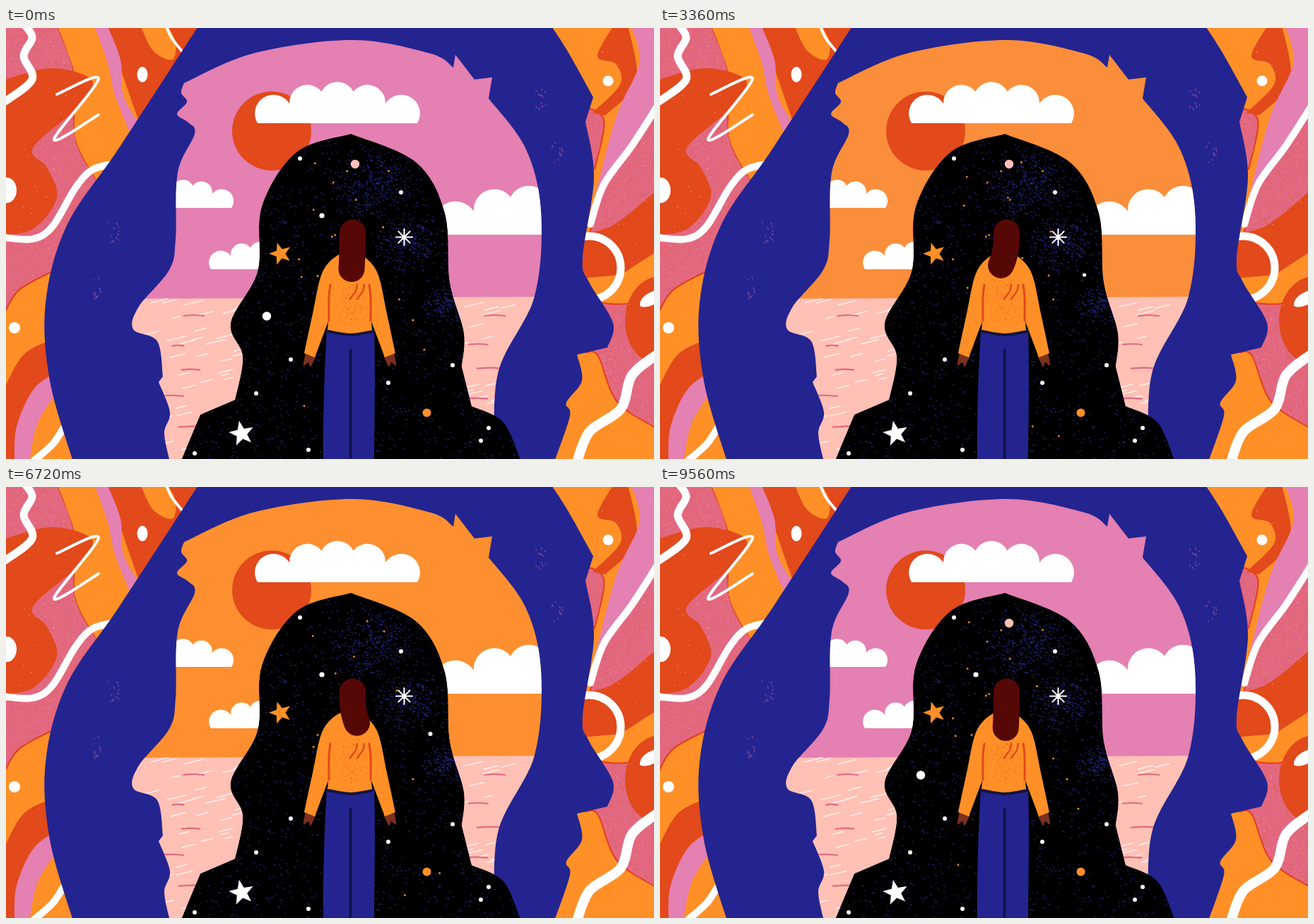
These frames come from a looping animation (917 px wide and 611 px high, 9.6 s). An HTML page:

```html
<!DOCTYPE html>
<html lang="en">
<head>
<meta charset="utf-8">
<title>Inner sky</title>
<style>
  html, body { margin: 0; width: 100%; height: 100%; overflow: hidden; background: #ff9027; }
  svg { display: block; width: 100%; height: 100%; }
</style>
</head>
<body>
<svg id="stage" viewBox="0 0 917 611" preserveAspectRatio="none" stroke-linecap="round" stroke-linejoin="round"></svg>
<script>
const LOOP = 9600, TWINKLE = LOOP / 2, LIT = 3000, FADE = 160;
const C = {
  orange: '#ff9027', red: '#e2491b', pink: '#e480b2', rose: '#e2687f', line: '#e43d1c',
  blue: '#242490', sea: '#ffc0b5', white: '#fff', black: '#000', hair: '#560807', skin: '#7c3020'
};
const stage = document.getElementById('stage');

function add(tag, attrs, parent = stage) {
  const el = document.createElementNS('http://www.w3.org/2000/svg', tag);
  for (const k in attrs) el.setAttribute(k, attrs[k]);
  return parent.appendChild(el);
}

// Smooth line through "x,y x,y"; a slash makes a sharp corner
function curve(text) {
  return text.split('/').map((part, n) => {
    const p = part.trim().split(/\s+/).map(s => s.split(',').map(Number));
    let d = (n ? 'L' : 'M') + p[0];
    for (let i = 0; i < p.length - 1; i++) {
      const b = p[i], c = p[i + 1], a = p[i - 1] || b, e = p[i + 2] || c;
      d += `C${b[0] + (c[0] - a[0]) / 6},${b[1] + (c[1] - a[1]) / 6} ` +
           `${c[0] - (e[0] - b[0]) / 6},${c[1] - (e[1] - b[1]) / 6} ${c}`;
    }
    return d;
  }).join('');
}

const shape = (fill, d, parent, extra) => add('path', { d, fill, ...extra }, parent);
const blob = (fill, text, parent, extra) => shape(fill, curve(text) + 'Z', parent, extra);
const line = (color, width, text, parent) =>
  shape('none', curve(text), parent, { stroke: color, 'stroke-width': width });
const oval = (fill, cx, cy, rx, ry = rx, parent) => add('ellipse', { cx, cy, rx, ry, fill }, parent);
const edge = { stroke: C.line, 'stroke-width': 2 };

let seed = 7;
const rnd = () => (seed = (seed * 16807) % 2147483647) / 2147483647;
const even = () => rnd() * 2 - 1;
const bell = () => rnd() + rnd() - 1;

// Scatter of short marks drawn as one path
function scatter(color, n, x, y, w, h, { parent, size = 1.1, opacity = 1, dx = 1, dy = 0.5, pick = even } = {}) {
  let d = '';
  for (let i = 0; i < n; i++) {
    const k = 0.5 + rnd();
    d += `M${(x + pick() * w).toFixed(1)},${(y + pick() * h).toFixed(1)}l${(dx * k).toFixed(1)},${(dy * k).toFixed(1)}`;
  }
  shape('none', d, parent, { stroke: color, 'stroke-width': size, opacity });
}

let clips = 0;
function clipped(d) {
  const id = 'clip' + clips++;
  add('path', { d }, add('clipPath', { id }));
  return add('g', { 'clip-path': `url(#${id})` });
}

// Rose area with printed grain
function grainy(text, x, y, w, h) {
  blob(C.rose, text, stage, edge);
  const g = clipped(curve(text) + 'Z');
  scatter(C.red, w * h / 9, x, y, w, h, { parent: g, opacity: 0.35 });
  scatter('#e895bd', w * h / 12, x, y, w, h, { parent: g, opacity: 0.4 });
}

function drawLeft() {
  grainy('-4,-4 / 72,-4 96,62 98,155 128,215 / 110,340 / 68,344 18,372 -4,408', 55, 190, 60, 190);
  blob(C.orange, '72,-4 84,25 100,80 98,155 128,215 / 200,140 / 135,-4');
  blob(C.red, '-4,74 65,57 122,75 97,116 38,170 58,198 72,240 40,284 -4,294');
  blob(C.red, '143,-4 163,60 190,138 / 280,-4');
  blob(C.pink, '125,-4 144,50 154,95 176,150 / 190,138 166,95 162,45 143,-4');
  blob(C.orange, '190,-4 208,32 235,45 240,20 228,-4');
  blob(C.orange, '-4,408 18,372 68,344 / 110,400 110,620 / -4,620', stage, edge);
  blob(C.red, '70,440 25,463 -4,514 / -4,620 / 14,611 / 80,490');
  blob(C.pink, '80,483 40,511 15,565 12,615 / 33,615 45,560 75,512');
  line(C.white, 10, '-4,297 38,299 66,281 98,227 122,201 156,192');
  line(C.white, 11, '27,-4 37,14 25,40 37,73 -4,106');
  line(C.white, 4, '72,94 131,72 68,158 131,123');
  line(C.white, 4, '227,-2 235,15 250,34');
  line(C.white, 10, '82,566 66,590 40,613');
  oval(C.white, 193, 66, 7.5, 11);
  oval(C.white, 1, 230, 14, 18);
  oval(C.white, 12, 425, 8);
}

function drawRight() {
  grainy('812,110 846,130 833,200 / 812,200', 835, 150, 14, 45);
  blob(C.red, '860,-4 837,40 863,51 869,80 830,120 / 848,124 892,75 880,-4');
  grainy('925,105 / 850,214 820,310 / 925,300', 880, 200, 45, 90);
  blob(C.pink, '884,-4 896,50 862,130 826,270 / 850,214 885,165 925,100 / 925,-4');
  blob(C.red, '925,226 860,279 810,292 / 812,355 / 870,350 925,314');
  grainy('828,388 882,390 925,360 / 925,570 865,530 838,465 820,460', 872, 465, 50, 105);
  oval(C.red, 926, 415, 50, 63);
  add('circle', { cx: 825, cy: 340, r: 45, fill: 'none', stroke: C.white, 'stroke-width': 11 });
  line(C.white, 10, '921,112 885,168 846,222 827,278');
  line(C.white, 14, '924,461 886,492 870,540 826,572 808,615');
  oval(C.white, 852, 75, 7.5);
  shape(C.white, 'M897,394Q896,378 925,370V388Q905,399 897,394Z');
}

function drawFaces() {
  blob(C.blue, '273,-4 160,170 86,280 56,390 62,500 95,615 / 776,615 798,550 793,531 815,500 808,463 / 851,453 859,418 825,360 816,326 832,212 820,133 / 831,98 796,35 771,-4');
  for (let i = 0; i < 4; i++)
    scatter(C.pink, 12, i % 2 ? 744 + i * 12 : 152 - i * 13, 60 + 230 * !(i % 2) + 39 * i, 8, 15,
      { opacity: 0.6, dy: 2, size: 1 });
}

// Flat base with round bumps under an arched envelope
function cloud(x, base, w, h, n, parent) {
  let d = `M${x},${base}`;
  for (let i = 1; i <= n; i++) {
    const r = w / n * 0.56;
    d += `A${r},${r} 0 0 1 ${x + w * i / n},${base - h * Math.sin(Math.PI * i / n)}`;
  }
  shape(C.white, d + 'Z', parent);
}

let sky;
function drawWindow() {
  const rim = '252,78 350,36 490,17 600,36 633,56 / 636,38 663,73 / 688,70 683,100';
  const right = '683,100 735,170 757,260 748,380 696,490 692,615';
  const left = '232,615 224,574 232,545 216,502 / 222,494 214,444 180,427 188,395 231,343 240,300 243,205 267,150 258,134 242,122 256,105 248,92 252,78';
  const g = clipped(curve([rim, right, left].join('/')) + 'Z');
  sky = add('rect', { width: 917, height: 400 }, g);
  oval(C.red, 376, 146, 56, 56, g);
  cloud(356, 135, 226, 47, 5, g);
  cloud(182, 255, 137, 33, 5, g);
  cloud(290, 342, 140, 32, 5, g);
  cloud(610, 293, 260, 56, 5, g);
  shape(C.sea, 'M150,384L780,381V620H150Z', g);
  for (const x of [262, 690]) {
    scatter(C.white, 50, x, 495, 85, 110, { parent: g, dx: 20, dy: -5, size: 1.6, opacity: 0.7 });
    for (let y = 408; y < 600; y += 30 + rnd() * 14) {
      const at = x - 30 + even() * 22, w = 15 + rnd() * 35;
      line(C.rose, 2.2, `${at},${y} ${at + w / 2},${y - 1} ${at + w},${y}`, g);
    }
  }
}

const flecks = [], lights = [];
function drawMane() {
  const d = curve('488,150 411,176 362,253 356,345 318,418 335,466 324,527 / 275,548 247,615 / 729,615 704,559 659,536 / 645,480 648,432 628,360 621,262 580,190 488,150') + 'Z';
  const g = clipped(d);
  shape(C.black, d, g);
  const mist = (n, x, y, w, h, pick) =>
    scatter('#2b32a0', n, x, y, w, h, { parent: g, dx: 1.6, dy: 1, opacity: 0.75, pick });
  mist(1700, 488, 390, 240, 230, even);
  for (let i = 0; i < 3; i++) mist(320 - i * 90, 522 + i * 50, 220 + i * 85, 70 - i * 18, 52 - i * 10, bell);

  for (let i = 0; i < 40; i++) {
    const y = 170 + rnd() * 420, half = 70 + (y - 170) * 0.2;
    flecks.push({ el: oval(C.orange, 490 + even() * half, y, 1.4), phase: rnd() * TWINKLE });
  }
}

function star(fill, cx, cy, R, turn) {
  let d = '';
  for (let i = 0; i < 10; i++) {
    const a = turn + i * Math.PI / 5, q = i % 2 ? R * 0.42 : R;
    d += `${i ? 'L' : 'M'}${cx + q * Math.sin(a)},${cy - q * Math.cos(a)}`;
  }
  shape(fill, d + 'Z');
}

// Spokes from radius a to b
function rays(n, a, b, color, parent) {
  let d = '';
  for (let i = 0; i < n; i++) {
    const s = Math.sin(i * 2 * Math.PI / n), c = Math.cos(i * 2 * Math.PI / n);
    d += `M${a * s},${-a * c}L${b * s},${-b * c}`;
  }
  shape('none', d, parent, { stroke: color, 'stroke-width': 2.1 });
}

function light(x, y, start, len = LIT) {
  const g = add('g', {});
  lights.push({ g, x, y, start, len });
  return g;
}

function drawStars() {
  star(C.orange, 388.5, 320, 16.5, -0.3);
  star(C.white, 333.5, 575, 18.5, -0.2);
  rays(8, 0, 11.5, C.white, add('g', { transform: 'translate(563.5 296.5)' }));
  oval(C.orange, 595.5, 545.5, 6);
  const fixed = '416,185 559,233 403,470 354,518 541,503 632,478 683,567 672,585 428,598 267,603';
  for (const p of fixed.split(' ')) oval(C.white, ...p.split(','), 3);
  oval(C.sea, 0, 0, 6.2, 6.2, light(494, 193, 2000));
  oval(C.white, 0, 0, 3.6, 3.6, light(447, 266, 3980));
  oval(C.white, 0, 0, 6.2, 6.2, light(369, 408.5, 3600));
  oval(C.white, 0, 0, 3, 3, light(600.5, 350, 500));
  rays(4, 0, 10.5, C.white, light(406.5, 238, 550, 700));
  rays(7, 13, 16, C.sea, light(590, 415, 1240, 440));
}

let hair;
function drawWoman() {
  shape(C.blue, 'M454,427H521C523,490 521,560 521,615H449C448,550 451,480 454,427Z');
  line('#10104a', 3.5, '487.5,456 487.5,615');
  for (const side of ['', 'translate(973 0) scale(-1 1)']) {
    const g = add('g', { transform: side });
    blob(C.skin, '424,460 421,478 428,474 431,480 439,464', g);
    blob(C.orange, '490,318 468,323 447,348 434,405 422,461 / 437,467 / 447,440 456,416 / 455,429 490,435', g);
    line(C.red, 3, '459,364 457,382 457,415', g);
  }
  line('#141440', 4, '456,430 488,435 520,430');
  scatter(C.red, 110, 488, 385, 30, 45, { size: 1, opacity: 0.6, pick: bell });
  for (const x of [497, 507]) line(C.red, 2.5, `${x},364 ${x - 2},373 ${x - 10},384`);
  hair = shape('none', '', stage, { stroke: C.hair, 'stroke-width': 37 });
}

const clamp = v => Math.max(0, Math.min(1, v));
const ease = v => { v = clamp(v); return v * v * (3 - 2 * v); };
const cycle = t => ((t % TWINKLE) + TWINKLE) % TWINKLE;
const dusk = [228, 128, 178], noon = [255, 144, 39];

function draw(t) {
  const warm = ease((t - 1480) / 2480) - ease((t - 6320) / 2640);
  sky.setAttribute('fill', `rgb(${dusk.map((v, i) => Math.round(v + (noon[i] - v) * warm))})`);

  const s = Math.sin(2 * Math.PI * t / LOOP);
  hair.setAttribute('d', `M490.5,290Q${490.5 + s},318 ${489 - 8 * s},${341.5 - 8 * s * s}`);

  for (const { g, x, y, start, len } of lights) {
    const q = cycle(t - start), k = clamp(Math.min(q, len - q) / FADE);
    g.setAttribute('transform', `translate(${x} ${y}) scale(${k})`);
  }
  for (const { el, phase } of flecks) el.style.opacity = cycle(t - phase) < TWINKLE * 0.55 ? 1 : 0;
}

drawLeft();
drawRight();
for (const x of [70, 870]) scatter(C.sea, 35, x, 300, 50, 300, { size: 1, opacity: 0.7 });
drawFaces();
drawWindow();
drawMane();
drawStars();
drawWoman();

const begin = performance.now();
function tick() {
  draw((performance.now() - begin) % LOOP);
  requestAnimationFrame(tick);
}
draw(0);
requestAnimationFrame(tick);
</script>
</body>
</html>
```
